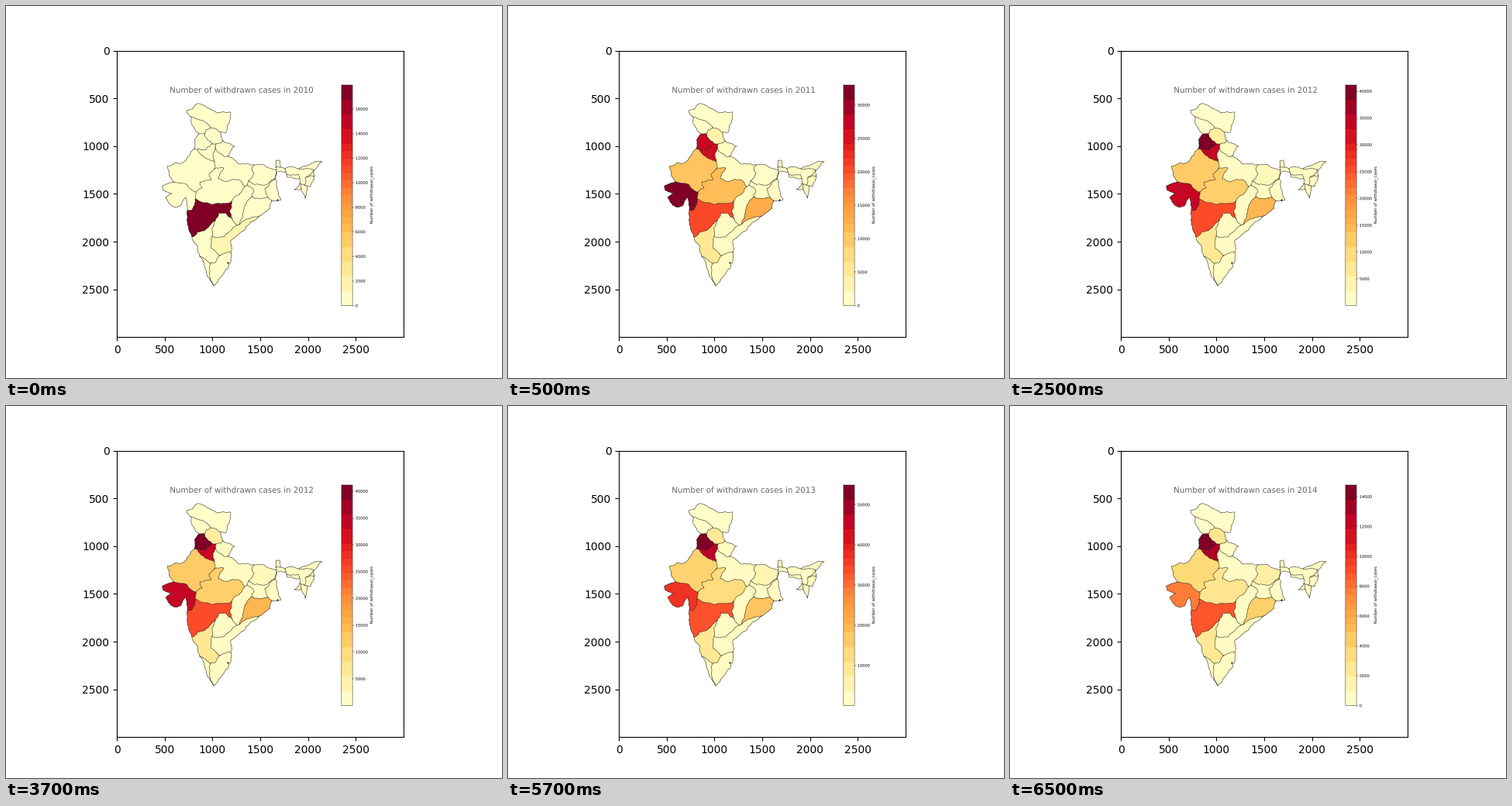
A matplotlib script for the animation above (8000 ms loop, 640 by 480 pixels).

```python
import math
import random

import matplotlib.pyplot as plt
from matplotlib.animation import FuncAnimation
from matplotlib.patches import PathPatch, Polygon, Rectangle
from matplotlib.textpath import TextPath
from matplotlib.transforms import Affine2D

STEP_MS, FRAMES = 500, 16
CMAP = plt.get_cmap("YlOrRd")

# The chart is a 10 inch figure shrunk into the framed axes.
LEFT, TOP, SIDE = 143.2, 57.6, 369.6
PT = SIDE / 720
BAR_X, BAR_TOP = LEFT + 0.78375 * SIDE, TOP + 0.12 * SIDE
BAR_H = 0.77 * SIDE
BAR_W = BAR_H / 20

# lowest and highest value of each year
RANGES = {2010: (0, 17950), 2011: (0, 33000), 2012: (20, 41150),
          2013: (20, 54900), 2014: (0, 14780)}
# share of the scale in 2011 and its change per year
TRENDS = {"PB": (0.84, 0.16), "HR": (0.81, 0.03), "GJ": (1, -0.155),
          "MH": (0.64, -0.01), "OD": (0.4, -0.04), "MP": (0.34, -0.055),
          "RJ": (0.32, -0.025), "KA": (0.16, 0), "HP": (0.1, 0.025),
          "BR": (0.02, 0.03), "JK": (0.01, 0), "LA": (0.01, 0)}

rng = random.Random(7)
borders = []


def level(code, year):
    if year == 2010:
        return {"MH": 1.0, "AP": 0.08}.get(code, 0.01)
    start, change = TRENDS.get(code, (0.03, 0))
    return min(1.0, start + change * (year - 2011))


def rough(a, b):
    """Points after a up to b, with midpoints pushed aside at random."""
    dx, dy = b[0] - a[0], b[1] - a[1]
    if math.hypot(dx, dy) < 2.5:
        return [b]
    off = rng.uniform(-0.13, 0.13)
    mid = ((a[0] + b[0]) / 2 - dy * off, (a[1] + b[1]) / 2 + dx * off)
    return rough(a, mid) + rough(mid, b)


def trace(*tokens):
    """Follow x, y pairs; a string names the states beside the next stretch."""
    items, last, line = iter(tokens), None, None
    for item in items:
        if isinstance(item, str):
            line = [last]
            borders.append((item.split(), line))
            continue
        point = (item, next(items))
        if line:
            line += rough(last, point)
        last = point


def ring(code):
    """Chain all borders of a state into one closed outline."""
    parts = [line for codes, line in borders if code in codes]
    outline = list(parts.pop(0))
    while parts:
        end = outline[-1]
        line = next(p for p in parts if end in (p[0], p[-1]))
        parts.remove(line)
        outline += line[1:] if line[0] == end else line[-2::-1]
    return outline


# Outer edge, clockwise from the north-west
trace(249, 165, "JK", 239, 151, 239, 143, "LA", 233, 135, 247, 126, 259, 131, 272, 138,
      290, 137, 290, 145, 284, 163, 277, 163, "HP", 280, 174, "UK", 295, 181, 286, 194,
      "UP", 303, 204, 320, 205, "BR", 349, 212, "WB", 348, 208, "SK", 348, 200, 353, 199,
      354, 208, "WB", 360, 210, "AS", 378, 210, "AR", 397, 202, 408, 201, 397, 212,
      "NL", 398, 219, "MN", 393, 233, 388, 232, "MZ", 386, 248, 381, 236,
      "TR", 372, 237, 379, 229, "AS", 379, 223, "ML", 363, 221, 362, 217,
      "AS", 361, 214, "WB", 350, 214, 355, 250, 343, 251)
trace(343, 251, "OD", 341, 261, 327, 271, "AP", 307, 290, 290, 303, 290, 318,
      "TN", 286, 339, 275, 352, 268, 361, "KL", 258, 341, 250, 323, "KA", 240, 298,
      "MH", 234, 272, 234, 264, "GJ", 232, 247, 225, 258, 216, 259, 206, 247, 214, 242,
      203, 238, 202, 232, 217, 227, "RJ", 208, 207, 228, 202, 243, 184, "PB", 249, 165)

# Inner borders, north to south
trace(239, 143, "LA JK", 250, 147, 264, 157, "LA HP", 277, 163)
trace(249, 165, "JK PB", 256, 165, "JK HP", 258, 160, 264, 157)
trace(256, 165, "HP PB", 266, 178, "HP HR", 271, 178, "HP UK", 280, 174)
trace(243, 184, "PB RJ", 247, 185, "PB HR", 257, 186, 266, 178)
trace(247, 185, "HR RJ", 259, 197, 269, 201, "HR UP", 267, 190, 270, 182,
      "HR UK", 271, 178)
trace(270, 182, "UK UP", 281, 194, 286, 194)
trace(269, 201, "UP RJ", 269, 210, "MP RJ", 262, 217, 265, 224, 250, 227, 253, 235,
      245, 240, "RJ GJ", 234, 231, 217, 227)
trace(269, 210, "UP MP", 281, 209, 274, 223, 300, 224, 308, 233, "UP CG", 311, 231,
      "UP JH", 313, 226, "UP BR", 320, 217, 317, 211, 320, 205)
trace(245, 240, "GJ MP", 244, 249, "GJ MH", 240, 263, 234, 264)
trace(244, 249, "MP MH", 257, 254, 291, 252, "MP CG", 304, 240, 308, 233)
trace(291, 252, "MH CG", 292, 275, "MH TG", 283, 267, 275, 267, 270, 277,
      "MH KA", 261, 286, 247, 292, 240, 298)
trace(270, 277, "KA TG", 266, 297, "KA AP", 265, 313, 276, 322,
      "KA TN", 270, 331, 264, 332, "KA KL", 250, 323)
trace(266, 297, "TG AP", 281, 298, 298, 283, "CG AP", 301, 282,
      "OD AP", 316, 273, 327, 271)
trace(292, 275, "TG CG", 298, 283)
trace(264, 332, "TN KL", 268, 361)
trace(276, 322, "AP TN", 290, 318)

# Inner borders, east
trace(301, 282, "CG OD", 306, 267, 317, 246, "OD JH", 338, 247, "OD WB", 343, 251)
trace(311, 231, "CG JH", 320, 239, 317, 246)
trace(313, 226, "BR JH", 337, 230, 347, 223, "BR WB", 349, 212)
trace(347, 223, "JH WB", 334, 236, 338, 247)
trace(348, 208, "WB SK", 354, 208)
trace(360, 210, "WB AS", 361, 214)
trace(378, 210, "AS AR", 397, 212)
trace(397, 212, "AS NL", 387, 221, "AS MN", 385, 231, "AS MZ", 381, 230,
      "AS TR", 379, 229)
trace(387, 221, "NL MN", 398, 219)
trace(385, 231, "MN MZ", 388, 232)
trace(381, 230, "TR MZ", 381, 236)
trace(362, 217, "AS ML", 377, 217, 379, 223)

fig, frame_ax = plt.subplots(figsize=(6.4, 4.8), dpi=100)
frame_ax.set(xlim=(-0.5, 2999.5), ylim=(2999.5, -0.5), aspect="equal",
             xticks=range(0, 3000, 500), yticks=range(0, 3000, 500))

chart = fig.add_axes([0, 0, 1, 1])
chart.set(xlim=(0, 640), ylim=(480, 0))
chart.axis("off")

states = {code: chart.add_patch(Polygon(ring(code), lw=0))
          for code in sorted({c for codes, _ in borders for c in codes})}
for _, line in borders:
    chart.plot(*zip(*line), color="black", lw=0.33)
for x, y in [(286, 330.5), (350, 250)]:  # enclave and delta
    chart.plot(x, y, "o", ms=1.5, color="black", mew=0)


def label(text, x, y, points, align=0.0, angle=0, color="black"):
    """Place outlined text; align is the share of the width left of x."""
    path = TextPath((0, 0), text, size=points * PT)
    place = (Affine2D().translate(-align * path.get_extents().x1, 0)
             .scale(1, -1).rotate_deg(angle).translate(x, y))
    return chart.add_patch(PathPatch(path.transformed(place), fc=color, lw=0))


BANDS = 30
for i in range(BANDS):
    # the ends of the bar step in pairs
    shade = i if 10 <= i < 22 else i // 2 * 2 + 0.5
    chart.add_patch(Rectangle((BAR_X, BAR_TOP + BAR_H * (1 - (i + 1) / BANDS)), BAR_W,
                              BAR_H / BANDS, fc=CMAP(shade / (BANDS - 1.5)), lw=0, aa=False))
chart.add_patch(Rectangle((BAR_X, BAR_TOP), BAR_W, BAR_H, fill=False, lw=0.3, snap=False))
label("Number of withdrawal_cases", 473.2, BAR_TOP + BAR_H / 2, 10, align=0.5, angle=-90)

changing = []


def draw(frame):
    year = 2010 + (frame + 3) // 4
    low, high = RANGES[year]
    step = next(s for s in (2000, 5000, 10000) if high / s < 9)
    while changing:
        changing.pop().remove()
    for code, patch in states.items():
        patch.set_facecolor(CMAP(level(code, year)))
    changing.append(label(f"Number of withdrawn cases in {year}", 303.6, 111.9, 20,
                          align=0.5, color="#666666"))
    right = BAR_X + BAR_W
    for value in range(0 if low == 0 else step, high, step):
        y = BAR_TOP + BAR_H * (high - value) / (high - low)
        changing.extend(chart.plot([right, right + 3.5 * PT], [y, y], color="black", lw=0.3))
        changing.append(label(str(value), right + 7 * PT, y + 1.9, 10))
    return changing


anim = FuncAnimation(fig, draw, frames=FRAMES, interval=STEP_MS, repeat=True,
                     repeat_delay=0, init_func=lambda: draw(0), blit=False)
plt.show()
```
